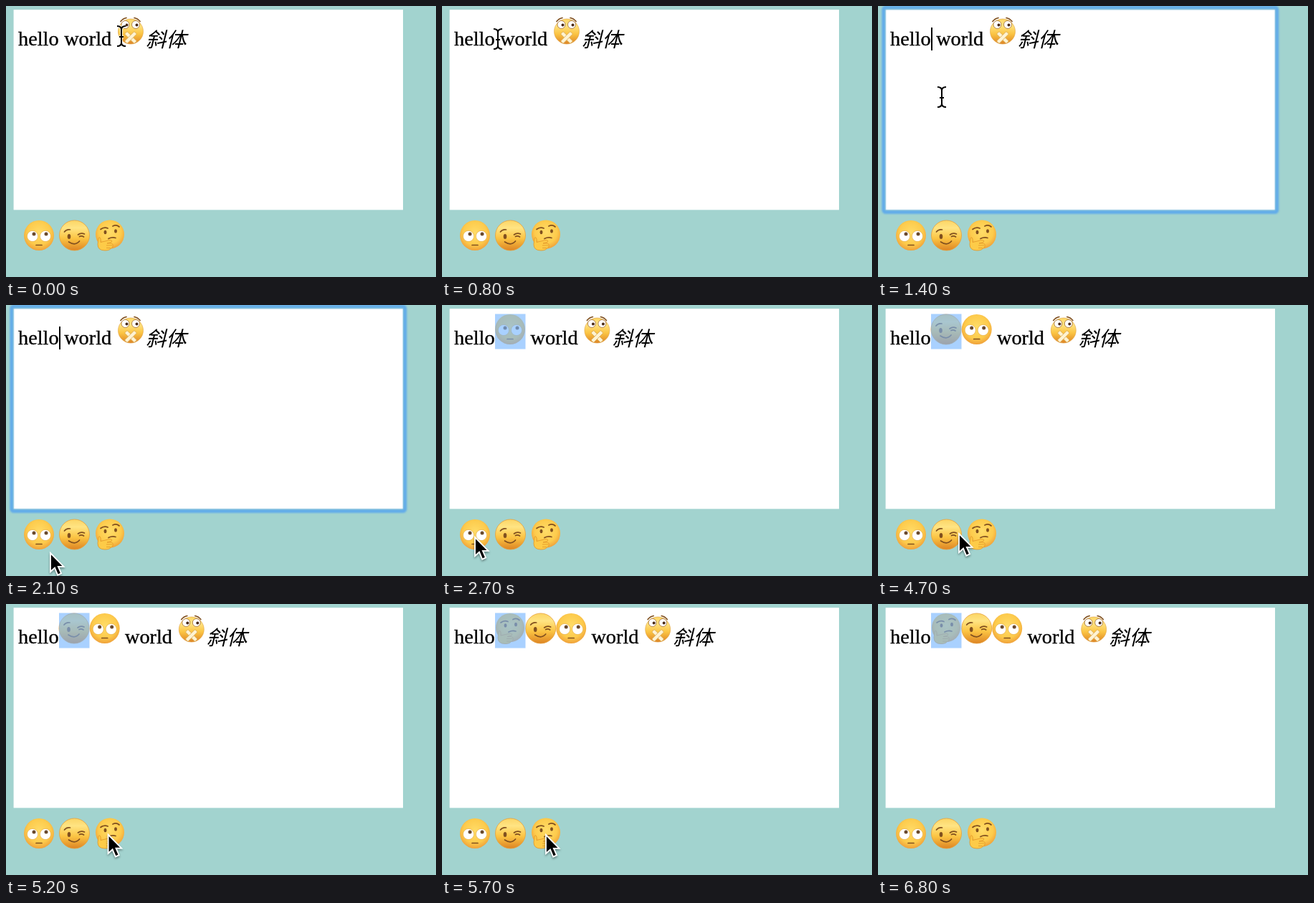
An HTML page for the animation above (6900 ms loop, 600 px wide and 378 px high).

```html
<!DOCTYPE html>
<html lang="en">
<head>
<meta charset="utf-8">
<title>Emoji editor</title>
<style>
  html, body { margin: 0; width: 100%; height: 100%; overflow: hidden; background: #a2d3cf; }
  svg { display: block; }
  text { font: 28.3px "Liberation Serif", "Times New Roman", serif; stroke: #000; stroke-width: .35; }
  .cjk { font: italic 28.3px "Noto Sans CJK SC", "Noto Sans CJK", sans-serif; stroke: none; }
  .line { fill: none; stroke: #80501f; stroke-width: 1.7; stroke-linecap: round; }
</style>
</head>
<body>
<svg width="600" height="378" viewBox="0 0 600 378">
  <defs>
    <radialGradient id="skin" cx=".5" cy=".42" r=".6">
      <stop offset="0" stop-color="#ffdc68"/>
      <stop offset=".65" stop-color="#fdcb4c"/>
      <stop offset="1" stop-color="#ee9d38"/>
    </radialGradient>
    <linearGradient id="glow" x2="0" y2="1">
      <stop offset="0" stop-color="#fbd565"/>
      <stop offset=".25" stop-color="#ffe483"/>
      <stop offset=".6" stop-color="#fbc443"/>
      <stop offset="1" stop-color="#dd8424"/>
    </linearGradient>
    <filter id="shade" x="-50%" y="-50%" width="200%" height="200%">
      <feDropShadow dx="0" dy="2" stdDeviation="1.5" flood-opacity=".4"/>
    </filter>
    <filter id="soft"><feGaussianBlur stdDeviation=".8"/></filter>

    <g id="roll">
      <circle r="21" fill="url(#skin)"/>
      <g fill="#fff" stroke="#e3a43a" stroke-width=".6">
        <circle cx="-9" cy="1" r="7.6"/><circle cx="9" cy="1" r="7.6"/>
      </g>
      <g fill="#6b4a2e"><circle cx="-7" cy="-2" r="2.5"/><circle cx="10" cy="-2" r="2.5"/></g>
      <path class="line" d="M-4 13.5H4"/>
    </g>

    <g id="wink">
      <circle r="21" fill="url(#glow)" stroke="#e7a03a" stroke-width=".8"/>
      <ellipse cx="-7.5" cy="1.5" rx="2.3" ry="3.5" fill="#80501f"/>
      <path class="line" d="M-14 -5Q-11 -9 -6 -8M5 -1Q9 -4 14 -2M7 1.5Q10 0 13 2M-8 9Q1 15 7 8"/>
    </g>

    <g id="think">
      <circle cy="-1" r="20" fill="url(#skin)"/>
      <g fill="#80501f"><ellipse cx="-6.5" cy="-4" rx="2" ry="2.7"/><ellipse cx="8" cy="-5.5" rx="2" ry="2.7"/></g>
      <path class="line" d="M-13 -8Q-8 -12 -3 -9.5M4 -12.5Q9 -15 13 -11.5M-2 5Q3 2.5 8 4"/>
      <path d="M-16 5Q-14 1 -13 6V10L0 7Q4 7 2 10L-4 11.5Q5 11 4 14Q5 17 2 18Q0 21.5 -7 21.5Q-17 21.5 -17 13Z"
        fill="#fdcb48" stroke="#e49a2c" stroke-width=".9"/>
      <path d="M-5 14.5H3M-5 18H1" stroke="#e49a2c" stroke-width=".9"/>
    </g>

    <g id="hush">
      <circle r="17.5" fill="url(#glow)" stroke="#e0a040" stroke-width=".6"/>
      <g fill="#fff" stroke="#a06a2c" stroke-width=".8"><circle cx="-7.5" cy="-9.5" r="5.5"/><circle cx="7" cy="-9.5" r="5.5"/></g>
      <g fill="#4b2b18"><circle cx="-5.5" cy="-9" r="2"/><circle cx="8.5" cy="-9" r="2"/></g>
      <path class="line" d="M-14 -14Q-11 -18 -6 -19M5 -19Q10 -18 13 -14"/>
      <g transform="translate(0 8.5)" fill="#fff3d2" stroke="#d9a852" stroke-width=".8">
        <rect x="-9.5" y="-2.5" width="19" height="5" rx="1" transform="rotate(45)"/>
        <rect x="-9.5" y="-2.5" width="19" height="5" rx="1" transform="rotate(-45)"/>
      </g>
    </g>

    <path id="beam" fill="none" d="M-6 -14Q0 -14 0 -9V9Q0 14 -6 14M6 -14Q0 -14 0 -9M0 9Q0 14 6 14M-3 1H3"/>
  </defs>

  <rect width="600" height="378" fill="#a2d3cf"/>
  <rect x="10.6" y="5.2" width="543.4" height="279.2" fill="#fff"/>
  <g id="ring" fill="none" stroke="#62ace9" filter="url(#soft)">
    <rect x="7.8" y="2" width="549" height="285.5" rx="3" stroke-width="5"/>
  </g>

  <text x="17" y="55">hello</text>
  <use class="slot" x="95" y="34"/>
  <use class="slot" x="137.7" y="34"/>
  <use class="slot" x="180.2" y="34"/>
  <g id="tail">
    <text x="81.2" y="55">world</text>
    <use href="#hush" x="174" y="35.5"/>
    <text class="cjk" x="195" y="56.5">斜体</text>
  </g>
  <rect id="selection" x="74" y="12.5" width="42.5" height="49" fill="#74b5ff" fill-opacity=".62"/>
  <rect id="caret" x="74" y="30" width="2" height="32"/>

  <use href="#roll" x="46" y="320"/>
  <use href="#wink" x="95.5" y="320"/>
  <use href="#think" x="145" y="319.5"/>

  <g id="mouse">
    <path id="arrow" d="M0 0V26L6 20.5L10.2 30.5L15 28.4L10.8 18.8H18.5Z"
      stroke="#fff" stroke-width="1.8" filter="url(#shade)"/>
    <g id="ibeam">
      <use href="#beam" stroke="#fff" stroke-opacity=".8" stroke-width="4"/>
      <use href="#beam" stroke="#000" stroke-width="2"/>
    </g>
  </g>
</svg>
<script>
const LOOP = 6900, STEP = 100, FOCUS = 900;
const inserts = [[2500, '#roll'], [4100, '#wink'], [5500, '#think']];
// Pointer stops: time, x, y
const path = [
  [0, 161, 42], [300, 161, 42], [800, 78, 46], [1000, 78, 46], [1400, 89, 127],
  [1500, 89, 130], [2100, 62, 346], [2400, 46, 324], [2900, 46, 324], [3500, 90, 322],
  [3700, 92, 317], [4200, 92, 317], [4700, 113, 319], [5300, 145, 322],
  [6000, 145, 322], [6300, 146, 298], [6600, 160, 60]
];
const $ = id => document.getElementById(id);
const slots = document.querySelectorAll('.slot');
const show = (el, on) => el.setAttribute('visibility', on ? 'visible' : 'hidden');

function pointerAt(t) {
  const i = path.findIndex(p => p[0] > t);
  if (i < 0) return path[path.length - 1].slice(1);
  const [t0, x0, y0] = path[i - 1], [t1, x1, y1] = path[i];
  const k = (t - t0) / (t1 - t0), e = k * k * (3 - 2 * k);
  return [x0 + (x1 - x0) * e, y0 + (y1 - y0) * e];
}

function draw() {
  const t = Math.floor(performance.now() % LOOP / STEP) * STEP;
  const added = inserts.filter(([at]) => t >= at).map(([, id]) => id).reverse();
  const focused = t >= FOCUS && !added.length;

  slots.forEach((slot, i) => {
    show(slot, i < added.length);
    slot.setAttribute('href', added[i] || '');
  });
  $('tail').setAttribute('transform', `translate(${added.length * 42.4})`);
  show($('selection'), added.length);
  show($('ring'), focused);
  show($('caret'), focused && (t - FOCUS) % 1100 < 600);

  const [x, y] = pointerAt(t), inside = y < 284, visible = t <= 6600;
  $('mouse').setAttribute('transform', `translate(${x} ${y})`);
  show($('arrow'), visible && !inside);
  show($('ibeam'), visible && inside);
  requestAnimationFrame(draw);
}
draw();
</script>
</body>
</html>
```
